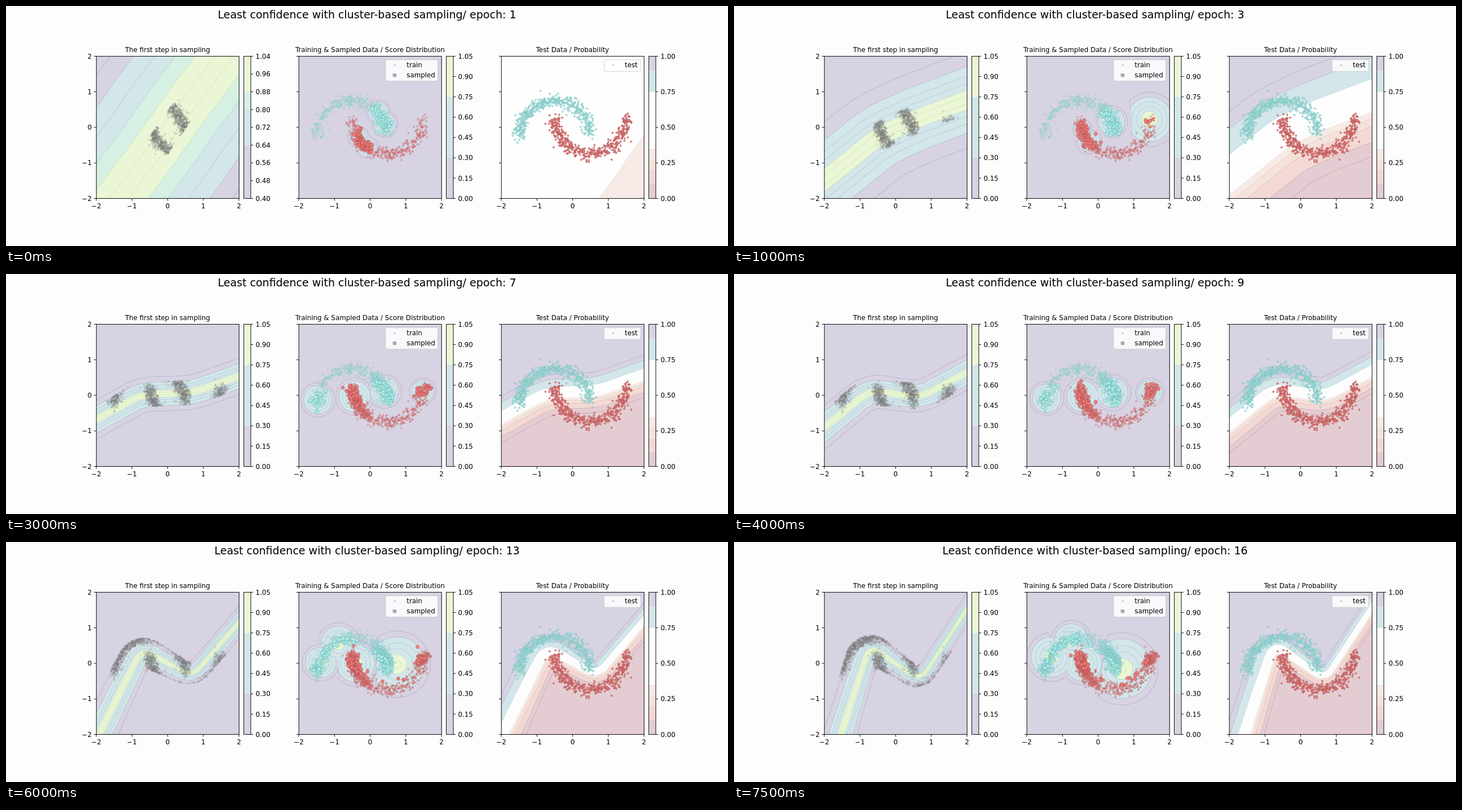
Recreate the animation shown at these times as an HTML page with a canvas. Size 1280 px wide and 427 px high, loop 8000 ms.

```html
<!DOCTYPE html>
<html lang="en">
<head>
<meta charset="utf-8">
<title>Sampling epochs</title>
<style>
  html, body { margin: 0; width: 100%; height: 100%; overflow: hidden; background: #fdfdfd; }
  canvas, svg { position: absolute; left: 0; top: 0; width: 1280px; height: 427px; }
  text { font: 11.85px "DejaVu Sans", sans-serif; fill: #000; }
  #title { font-size: 19.02px; }
  .mid { text-anchor: middle; }
  .end { text-anchor: end; }
</style>
</head>
<body>
<canvas id="stage" width="1280" height="427"></canvas>
<svg viewBox="0 0 1280 427"><text id="title" class="mid" x="640" y="22.3"></text><g id="fixed"></g><g id="scale"></g></svg>
<script>
const STEP = 500, EPOCHS = 16, SIZE = 254;
const LEFT = [160, 519, 878], TOP = 89, GAP = 359, UNIT = 63.2, CX = 286.5, CY = 216;

// Bands start at a level and run up to the next one.
const LAV = [215,211,226], TEAL = [211,230,234], LIME = [234,246,213], MINT = [214,240,227], WHITE = [254,254,254];
const SCORE = { bands: [[0, LAV], [.3, TEAL], [.75, LIME]], lines: steps(.15, .9, .15), min: 0, max: 1.05, tick: .15 };
const FIRST = { bands: [[.4, LAV], [.64, TEAL], [.8, MINT], [.88, LIME]], lines: steps(.48, .96, .08), min: .4, max: 1.04, tick: .08 };
const PROB = {
  bands: [[0, [228,205,210]], [.1, [243,216,213]], [.2, [244,227,218]], [.275, [247,234,230]], [.35, WHITE], [.75, TEAL], [.9, LAV]],
  lines: [.05, .1, .2, .275, .35, .4, .5, .6, .75, .9, .95], min: 0, max: 1, tick: .25
};

function steps(a, b, d) {
  return Array.from({ length: Math.round((b - a) / d) + 1 }, (_, i) => a + i * d);
}
const clamp = v => Math.max(0, Math.min(1, v));
const mix = (a, b, t) => a + (b - a) * t;

function random(seed) {
  return () => {
    seed = seed + 0x6D2B79F5 | 0;
    let t = Math.imul(seed ^ seed >>> 15, 1 | seed);
    t = t + Math.imul(t ^ t >>> 7, 61 | t) ^ t;
    return ((t ^ t >>> 14) >>> 0) / 4294967296;
  };
}

// Two interleaved half circles with noise, in the first panel's pixels.
function moons(count, seed) {
  const rnd = random(seed);
  const gauss = () => Math.sqrt(-2 * Math.log(1 - rnd())) * Math.cos(2 * Math.PI * rnd()) * .09;
  return Array.from({ length: count }, (_, i) => {
    const red = i % 2, s = red ? -1 : 1, t = Math.PI * rnd();
    const x = s * (Math.cos(t) - .5) + gauss(), y = s * (Math.sin(t) - .25) + gauss();
    return { x: CX + UNIT * x, y: CY - UNIT * y, red };
  });
}
const pool = moons(4200, 7), train = moons(800, 21), test = moons(900, 33);

// The decision curve: a near-straight line flattens, then folds into a peak and a trough.
function modelAt(epoch) {
  const swing = clamp((5 - epoch) / 4), g = clamp((epoch - 5) / 11), grow = g * g * (3 - 2 * g);
  const peak = [241 + 31 * swing, 217 + 30 * swing - 33 * grow];
  const trough = [330 - 25 * swing, 208 - 10 * swing + 39 * grow];
  const leftEnd = along(peak, 25 + 28 * swing + 47 * grow, -700);
  const rightEnd = along(trough, 16 + 37 * swing ** 3 + 41 * grow, 700);
  const kLeft = .37 + .8 * Math.min(6, epoch - 1), kRight = kLeft + 4.8 * grow * grow;
  return {
    kLeft, kRight,
    curve: [leftEnd, ...bend(leftEnd, peak, trough), ...bend(peak, trough, rightEnd), rightEnd]
  };
}

function along([x, y], degrees, length) {
  const a = degrees * Math.PI / 180;
  return [x + length * Math.cos(a), y - length * Math.sin(a)];
}

// Quadratic rounding of the corner at b.
function bend(a, b, c) {
  const toward = p => {
    const d = 24 / Math.hypot(p[0] - b[0], p[1] - b[1]);
    return [mix(b[0], p[0], d), mix(b[1], p[1], d)];
  };
  const from = toward(a), to = toward(c);
  return steps(0, 1, 1 / 6).map(t =>
    [0, 1].map(j => mix(mix(from[j], b[j], t), mix(b[j], to[j], t), t)));
}

// Signed distance to the curve times the local steepness.
function logit({ curve, kLeft, kRight }, x, y) {
  let best = 1e9, side = 1;
  for (let i = 0; i < curve.length - 1; i++) {
    const a = curve[i], b = curve[i + 1], dx = b[0] - a[0], dy = b[1] - a[1], px = x - a[0], py = y - a[1];
    let t = (px * dx + py * dy) / (dx * dx + dy * dy);
    t = t < 0 ? 0 : t > 1 ? 1 : t;
    const ex = px - t * dx, ey = py - t * dy, d = ex * ex + ey * ey;
    if (d < best) {
      best = d;
      side = dx * py - dy * px > 0 ? -1 : 1;
    }
  }
  return side * Math.sqrt(best) / UNIT * mix(kLeft, kRight, clamp((x - 200) / 130));
}

function nearest(centers, x, y) {
  let best = { d: 1e9 };
  for (const c of centers) {
    const d = Math.hypot(x - c.x, y - c.y);
    if (d < best.d) best = { c, d };
  }
  return best;
}

// k-means from evenly spread starts; a cluster reaches to its farthest point.
function clusters(points, count = 4) {
  const byX = [...points].sort((a, b) => a.x - b.x);
  let centers = Array.from({ length: count }, (_, i) => byX[Math.floor((i + .5) / count * byX.length)]);
  for (let round = 0; round < 12; round++) {
    const sums = new Map(centers.map(c => [c, { x: 0, y: 0, n: 0, r: 8 }]));
    for (const p of points) {
      const { c, d } = nearest(centers, p.x, p.y), s = sums.get(c);
      s.x += p.x; s.y += p.y; s.n++;
      s.r = Math.max(s.r, d);
    }
    centers = [...sums.values()].filter(s => s.n).map(s => ({ x: s.x / s.n, y: s.y / s.n, r: s.r }));
  }
  return centers;
}

function clusterScore(centers, x, y) {
  const { c, d } = nearest(centers, x, y);
  return Math.max(0, 1 - .85 * d / c.r);
}

// Least certain part of the pool, its clusters and the samples drawn from it.
const picks = [];
function pick(epoch) {
  if (!picks[epoch]) {
    const model = modelAt(epoch), rnd = random(epoch * 101);
    const ranked = pool.map(p => ({ p, u: Math.abs(logit(model, p.x, p.y)) })).sort((a, b) => a.u - b.u);
    const near = ranked.slice(0, pool.length * (.25 + .008 * (epoch - 1))).map(o => o.p);
    picks[epoch] = { near, centers: clusters(near), sampled: near.filter(() => rnd() < 150 / near.length) };
  }
  return picks[epoch];
}

function makeField(fn) {
  const f = new Float32Array(SIZE * SIZE);
  for (let y = 0; y < SIZE; y++)
    for (let x = 0; x < SIZE; x++) f[y * SIZE + x] = fn(LEFT[0] + x + .5, TOP + y + .5);
  return f;
}

// Filled bands with thin contour lines tinted by the band below them.
function paint(ctx, f, left, { bands, lines }) {
  const img = ctx.createImageData(SIZE, SIZE), m = SIZE - 1;
  for (let y = 0; y < SIZE; y++) for (let x = 0; x < SIZE; x++) {
    const i = y * SIZE + x, v = f[i];
    const gx = (f[i + (x < m)] - f[i - (x > 0)]) / 2, gy = (f[i + (y < m) * SIZE] - f[i - (y > 0) * SIZE]) / 2;
    const g = Math.hypot(gx, gy) + 1e-6;
    let [r, gr, b] = bands[0][1];
    for (let j = 1; j < bands.length; j++) {
      const w = clamp((v - bands[j][0]) / g + .5), c = bands[j][1];
      r += (c[0] - r) * w; gr += (c[1] - gr) * w; b += (c[2] - b) * w;
    }
    let ink = 0;
    for (const l of lines) ink = Math.max(ink, .85 - Math.abs(v - l) / g);
    const tint = c => c * mix(1, c / 255 * .97, ink);
    img.data.set([tint(r), tint(gr), tint(b), 255], i * 4);
  }
  ctx.putImageData(img, left, TOP);
}

function dots(ctx, points, shift, r, alpha, colors) {
  ctx.globalAlpha = alpha;
  ctx.lineWidth = .45;
  for (const p of points) {
    [ctx.fillStyle, ctx.strokeStyle] = colors[p.red];
    ctx.beginPath();
    ctx.arc(p.x + shift, p.y, r, 0, 7);
    ctx.fill();
    ctx.stroke();
  }
  ctx.globalAlpha = 1;
}
const CLASS = [["#aeeeea", "#4f9a98"], ["#f07c7c", "#8a3a3a"]];
const GREY = [["#929292", "#666"], ["#929292", "#666"]];

function legend(ctx, x, w, h) {
  ctx.beginPath();
  ctx.roundRect(x, 95.7, w, h, 2.5);
  ctx.fillStyle = "rgba(255,255,255,.85)";
  ctx.strokeStyle = "rgba(200,208,208,.85)";
  ctx.lineWidth = 1;
  ctx.fill();
  ctx.stroke();
}
function spot(ctx, x, y, r) {
  ctx.fillStyle = "#b0acae";
  ctx.beginPath();
  ctx.arc(x, y, r, 0, 7);
  ctx.fill();
}

const barY = (s, v) => 342.4 - (v - s.min) / (s.max - s.min) * 253;
const barTicks = s => steps(s.min, s.max, s.tick);
const scaleOf = epoch => epoch === 1 ? FIRST : SCORE;

function frame(ctx, left, scale) {
  const x = left + 261.6, w = 12.4;
  scale.bands.forEach(([from, c], i) => {
    const next = scale.bands[i + 1], y = barY(scale, next ? next[0] : scale.max);
    ctx.fillStyle = `rgb(${c})`;
    ctx.fillRect(x, y, w, barY(scale, from) - y);
  });
  ctx.strokeStyle = "#000";
  ctx.lineWidth = .95;
  ctx.strokeRect(left + .2, 89.4, 253, 253);
  ctx.strokeRect(x, 89.4, w, 253);
  ctx.beginPath();
  for (let i = -2; i <= 2; i++) {
    const tx = left + 126.6 + i * 63.25, ty = 215.9 - i * 63.25;
    ctx.moveTo(tx, 342.4); ctx.lineTo(tx, 346.6);
    ctx.moveTo(left, ty); ctx.lineTo(left - 4.1, ty);
  }
  for (const v of barTicks(scale)) {
    ctx.moveTo(x + w, barY(scale, v));
    ctx.lineTo(x + w + 4.1, barY(scale, v));
  }
  ctx.stroke();
}

function render(epoch) {
  const canvas = document.createElement("canvas");
  canvas.width = 1280;
  canvas.height = 427;
  const ctx = canvas.getContext("2d"), model = modelAt(epoch), score = scaleOf(epoch), now = pick(epoch);
  const prob = makeField((x, y) => 1 / (1 + Math.exp(-logit(model, x, y))));
  paint(ctx, prob.map(p => 2 * Math.min(p, 1 - p)), LEFT[0], score);
  paint(ctx, makeField((x, y) => clusterScore(now.centers, x, y)), LEFT[1], SCORE);
  paint(ctx, prob, LEFT[2], PROB);

  dots(ctx, now.near, 0, 1.4, .25, GREY);
  dots(ctx, train, GAP, 1.5, .45, CLASS);
  for (let e = 1; e < epoch; e++) dots(ctx, pick(e).sampled, GAP, 1.7, .45, CLASS);
  dots(ctx, now.sampled, GAP, 3, .95, CLASS);
  dots(ctx, test, 2 * GAP, 1.55, .95, CLASS);

  legend(ctx, 673, 92.5, 37.8);
  spot(ctx, 689, 105.3, 1.3);
  spot(ctx, 689, 123.2, 3.6);
  legend(ctx, 1060.4, 64.6, 20.6);
  spot(ctx, 1076.5, 105.3, 1.3);
  [score, SCORE, PROB].forEach((s, i) => frame(ctx, LEFT[i], s));
  return canvas;
}

const label = (x, y, s, cls = "") => `<text x="${x}" y="${y}" class="${cls}">${s}</text>`;
const barLabels = (left, s) => barTicks(s).map(v => label(left + 282.4, barY(s, v) + 4.3, v.toFixed(2))).join("");

function fixedText() {
  const titles = ["The first step in sampling", "Training &amp; Sampled Data / Score Distribution", "Test Data / Probability"];
  let out = titles.map((t, i) => label(LEFT[i] + 126.4, 82, t, "mid")).join("");
  for (let i = -2; i <= 2; i++) {
    const n = String(i).replace("-", "\u2212");
    for (const left of LEFT) out += label(left + 126.5 + i * 63.25, 359.8, n, "mid");
    out += label(152, 220.2 - i * 63.25, n, "end");
  }
  return out + barLabels(LEFT[1], SCORE) + barLabels(LEFT[2], PROB)
    + label(710.3, 109.4, "train") + label(710.3, 127.3, "sampled") + label(1097, 109.4, "test");
}

const $ = id => document.getElementById(id);
const stage = $("stage").getContext("2d");
const cache = [];
let shown = 0;
$("fixed").innerHTML = fixedText();

function tick() {
  const epoch = Math.floor(performance.now() / STEP) % EPOCHS + 1;
  if (epoch !== shown) {
    shown = epoch;
    cache[epoch] = cache[epoch] || render(epoch);
    stage.clearRect(0, 0, 1280, 427);
    stage.drawImage(cache[epoch], 0, 0);
    $("title").textContent = "Least confidence with cluster-based sampling/ epoch: " + epoch;
    $("scale").innerHTML = barLabels(LEFT[0], scaleOf(epoch));
  }
  requestAnimationFrame(tick);
}
tick();
</script>
</body>
</html>
```
